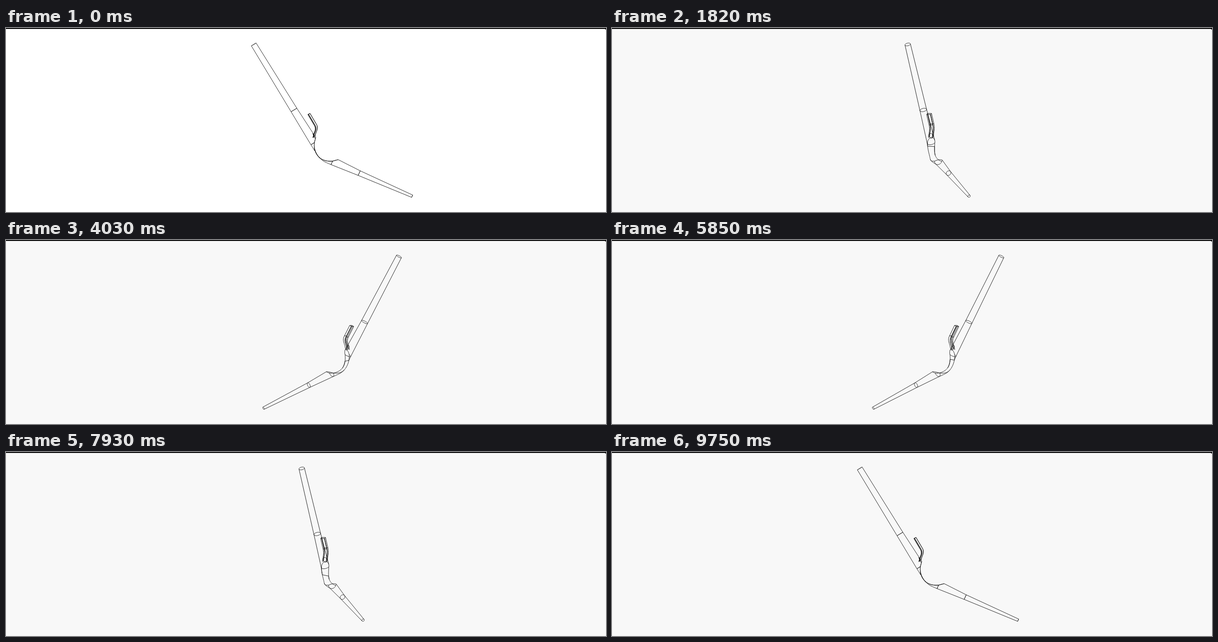
Animation, 1280 px wide and 395 px high, one loop 9.88 s. Source, as an HTML page with a canvas:

```html
<!DOCTYPE html>
<html lang="en">
<head>
<meta charset="utf-8">
<title>Rotating wireframe</title>
<style>
html, body { margin: 0; height: 100%; overflow: hidden; }
canvas { display: block; }
</style>
</head>
<body>
<canvas id="stage" width="1280" height="395"></canvas>
<script>
const g = document.getElementById('stage').getContext('2d');
const STEP = 130, STEPS = 76, TURN = Math.PI * 2 / 75, AXIS = 695;
let cos = 1, sin = 0;

// Orthographic view of a model spinning about a vertical axis
const view = ([x, y, z]) => [AXIS + (x - AXIS) * cos + z * sin + 0.5, y + 0.5];
const mix = (a, b, k) => a.map((v, i) => v + (b[i] - v) * k);
const range = (n, f) => Array.from({ length: n + 1 }, (_, i) => f(i / n));
const bezier = (a, b, c, d, s) => a.map((v, i) =>
  (1 - s) ** 3 * v + 3 * s * (1 - s) ** 2 * b[i] + 3 * s * s * (1 - s) * c[i] + s ** 3 * d[i]);

function line(points) {
  g.beginPath();
  for (const p of points) g.lineTo(...view(p));
  g.stroke();
}

// Cone between circles [x, y, r]; cutA and cutB pull the upper half of an end inwards
function tube(A, B, cutA = 0, cutB = 0) {
  const len = Math.hypot(B[0] - A[0], B[1] - A[1]);
  const dx = (B[0] - A[0]) / len, dy = (B[1] - A[1]) / len;
  const point = (end, a) => {
    const pull = Math.max(0, Math.cos(a)) / len;
    const [x, y, r] = mix(A, B, end ? 1 - cutB * pull : cutA * pull);
    return [x + r * Math.cos(a) * dy, y - r * Math.cos(a) * dx, r * Math.sin(a)];
  };
  const taper = (A[2] - B[2]) / len;
  const q = -taper * dx * sin / Math.hypot(dy * sin, cos);
  if (Math.abs(q) < 1) {
    const mid = Math.atan2(-cos, dy * sin), side = Math.acos(q);
    for (const a of [mid - side, mid + side]) line([point(0, a), point(1, a)]);
  }
  return end => line(range(48, k => point(end, k * Math.PI * 2)));
}

// Scoop joining the two tubes: a half-elliptic section from rim to keel
function neck() {
  const rim = s => bezier([657.3, 245.6], [655, 268], [668, 288], [696.6, 285.2], s);
  const keel = s => bezier([650, 250], [670, 283], [670, 283], [693, 292.8], s);
  const width = s => 8.4 - 1.7 * Math.sin(2 * Math.PI * s ** 1.6);
  const at = (s, a) => [...mix(rim(s), keel(s), Math.sin(a)), width(s) * Math.cos(a)];

  // The outline is where the projected surface folds over
  const fold = (s, a) => {
    const e = 1e-3, p = view(at(s, a)), u = view(at(s + e, a)), v = view(at(s, a + e));
    return (u[0] - p[0]) * (v[1] - p[1]) - (u[1] - p[1]) * (v[0] - p[0]);
  };
  const rows = 40, cols = 24;
  let run = [];
  for (let i = 0; i <= rows; i++) {
    const s = i / rows;
    let hit = null, last = fold(s, 0);
    for (let j = 1; j <= cols && !hit; j++) {
      const next = fold(s, j / cols * Math.PI);
      if (last * next < 0) hit = at(s, (j - 1 + last / (last - next)) / cols * Math.PI);
      last = next;
    }
    if (hit) run.push(hit);
    if (!hit || i === rows) { line(run); run = []; }
  }
  for (const a of [0, Math.PI]) line(range(rows, s => at(s, a)));
}

// Bent flat bar, drawn as copies of its centre line moved by off and z
function handle() {
  const bend = [659, 206.5];
  const bar = (off, z) => [[645.8, 184], ...range(20, s =>
    bezier(bend, [665.5, 217], [658, 222], [656.5, 234], s))]
    .map(([x, y]) => [x + 2.2 * off, y - 1.2 * off, z]);
  for (const z of [-4.7, 4.7]) {
    line(bar(1, z));
    line(bar(-1, z));
    line(bar(-0.4, z * 0.65));
    line([bar(-1, z)[0], bar(1, z)[0]]);
  }
  for (const off of [-1, 1])
    for (const i of [0, 1]) line([bar(off, -4.7)[i], bar(off, 4.7)[i]]);

  // Foot where the bar meets the tube
  line(range(32, k => {
    const a = k * Math.PI * 2, c = Math.cos(a);
    return [656.2 + 2.4 * c, 231 + 5.1 * c, 4.8 * Math.sin(a)];
  }));
}

function draw(time) {
  const step = Math.floor(time / STEP) % STEPS;
  cos = Math.cos(step * TURN);
  sin = Math.sin(step * TURN);
  g.fillStyle = step ? '#f8f8f8' : '#fff';
  g.fillRect(0, 0, 1280, 395);
  g.fillStyle = '#000';
  g.fillRect(0, 0, 1280, 2);
  g.fillRect(1278, 2, 2, 1);
  g.strokeStyle = '#000';
  g.lineWidth = 0.86;
  g.lineJoin = 'round';

  const joint = [613.8, 175.5, 7.2], knee = [753, 311, 5.4];
  const shaft = tube([528, 34.8, 5.9], joint);
  shaft(0);
  shaft(1);
  tube(joint, [657.3, 245.6, 8.6], 0, 8)(1);
  neck();
  tube([696.3, 285.3, 8.2], knee, 9.5)(0);
  const tip = tube(knee, [866, 360.6, 2.7]);
  tip(0);
  tip(1);
  handle();
}

let start;
function frame(now) {
  start ??= now;
  draw(now - start);
  requestAnimationFrame(frame);
}
requestAnimationFrame(frame);
</script>
</body>
</html>
```
